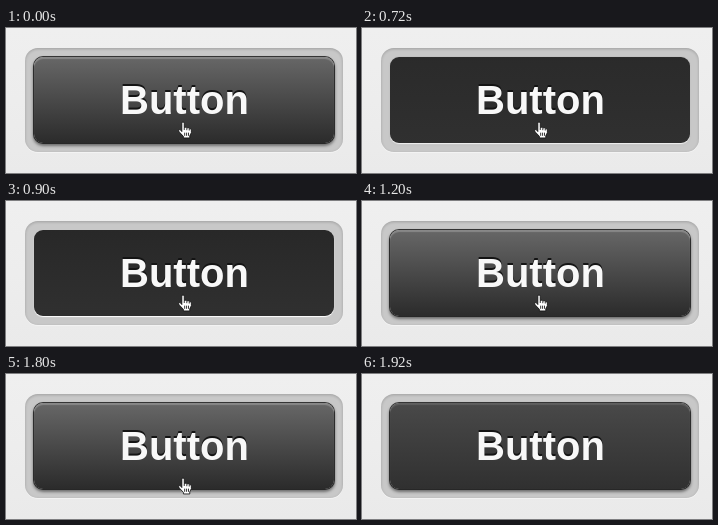
An HTML page for the animation above (2220 ms loop, 350 px wide and 145 px high).

```html
<!DOCTYPE html>
<html>
<head>
<meta charset="utf-8">
<style>
  html, body { margin: 0; width: 100%; height: 100%; overflow: hidden; }
  body { position: relative; background: linear-gradient(#efefef, #ededed 50%, #eaeaea); }
  .trough, .button, .hand { position: absolute; box-sizing: border-box; }
  .trough {
    left: 19px; top: 20px; width: 318px; height: 104px; border-radius: 13px;
    background: #c8c8c8;
    box-shadow: inset 0 1px 3px rgba(0,0,0,.2), 0 1px 0 rgba(255,255,255,.4);
  }
  .button {
    left: 28px; top: 29px; width: 300px; height: 86px; border-radius: 9px;
    font: bold 40px/86px "Liberation Sans", Arial, sans-serif;
    color: #f8f8f8; text-shadow: 0 -2px 0 #141414;
  }
  .button span { position: absolute; left: 86px; top: 0; }
  .hand { left: 171px; top: 93px; width: 16px; height: 18px; }
</style>
</head>
<body>
<div class="trough"></div>
<div class="button"><span>Button</span></div>
<svg class="hand" viewBox="0 0 15 17">
  <path d="M4.5 10V2.3Q4.5 1 5.6 1T6.8 2.3V6.3Q8.6 5.2 9.2 6.7 10.9 5.8 11.5 7.2 13.4 6.6 13.5 8.6V11L12 14V16H6V14.5L2 10.3Q.9 8.8 2 8.2T4.5 10Z"
        fill="#fff" stroke="#111" stroke-width=".8" stroke-linejoin="round"/>
  <path d="M6.8 6.5V8.5M9.2 7V8.7M11.5 7.4V9M7.2 11V14M9 11V14M10.8 11V14" fill="none" stroke="#111" stroke-width=".8"/>
</svg>
<script>
  const LOOP = 2220;
  const button = document.querySelector('.button');
  const hand = document.querySelector('.hand');

  // Greys at top and bottom, strength of the raised edge and of the drop shadow
  const hover = [103, 43, 1, 1];
  const active = [40, 48, 0, 0];
  const normal = [73, 48, .55, 1];
  const mix = (a, b, k) => a.map((v, i) => v + (b[i] - v) * k);

  // Start time, button look, cursor offset
  const steps = [
    [0, hover, 0],
    [660, [103, 43, .85, 0], 0],
    [720, mix(hover, active, .96), 0],
    [840, mix(hover, active, .98), 0],
    [900, active, 0],
    [1200, hover, 0],
    [1740, hover, 2],
    [1800, hover, 10],
    [1860, mix(hover, normal, .3), 32],
    [1920, normal, 70]
  ];

  function draw(now) {
    const t = now % LOOP;
    const [, [top, bottom, edge, drop], y] = steps.findLast(s => s[0] <= t);
    const grey = v => `rgb(${v},${v},${v})`;
    button.style.background = `linear-gradient(${grey(top)}, ${grey(bottom)})`;
    button.style.boxShadow = [
      `inset 0 2px 1px rgba(255,255,255,${.22 * edge})`,
      `0 0 0 1px rgba(20,20,20,${.8 * drop})`,
      `0 2px 3px 1px rgba(0,0,0,${.45 * drop})`,
      `0 1px 1px rgba(255,255,255,${1 - drop})`
    ].join();
    hand.style.transform = `translateY(${y}px)`;
    requestAnimationFrame(draw);
  }
  draw(performance.now());
</script>
</body>
</html>
```
